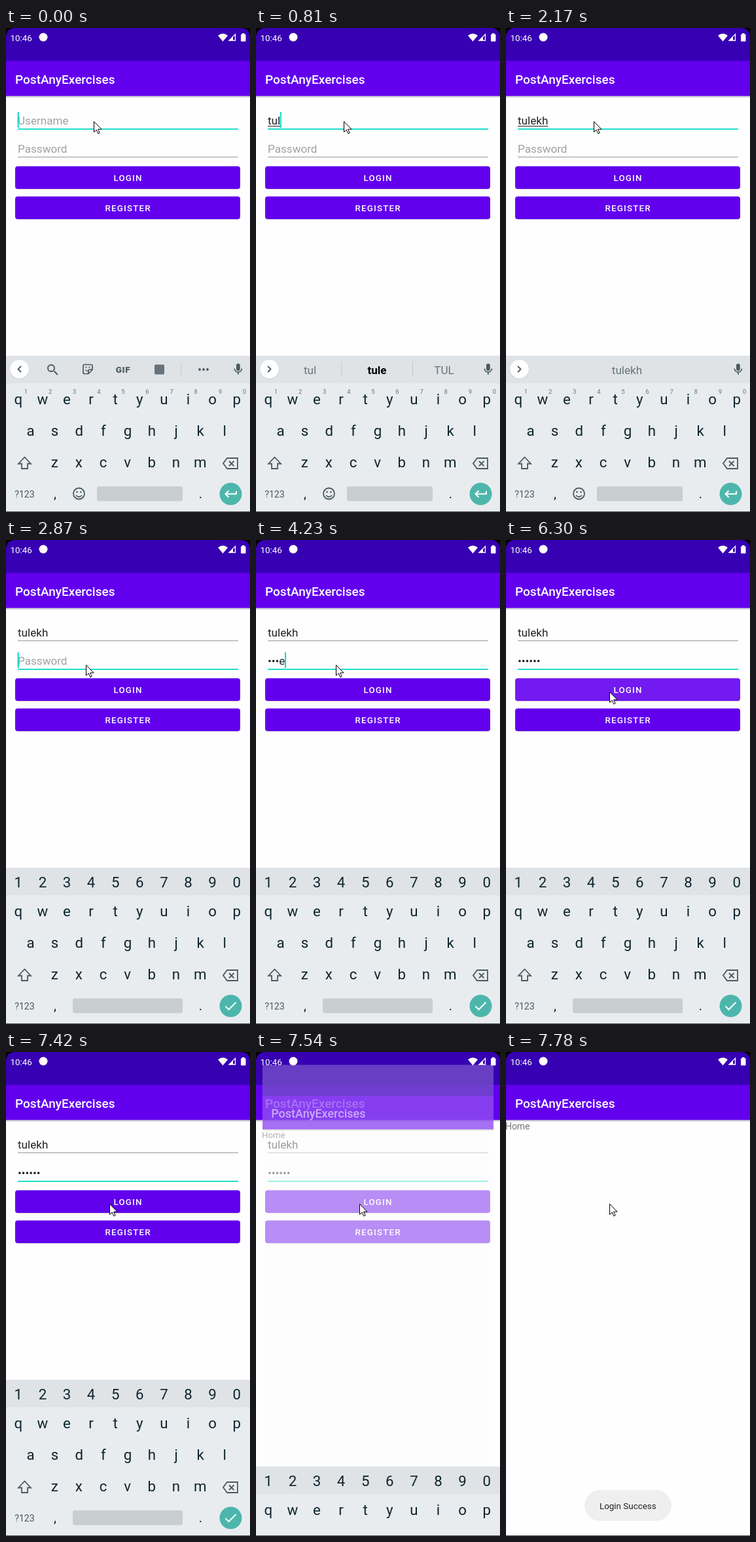
Animation, 373 px wide and 737 px high, one loop 8 s. Source, as an HTML page with a canvas:

```html
<!DOCTYPE html>
<html lang="en">
<head>
<meta charset="utf-8">
<title>Login demo</title>
<style>
  html, body { margin: 0; width: 100%; height: 100%; overflow: hidden; background: #fefefe; }
  canvas { display: block; }
</style>
</head>
<body>
<canvas id="stage" width="373" height="737"></canvas>
<script>
const W = 373, H = 737, LOOP = 8000;
const ctx = document.getElementById('stage').getContext('2d');
const PURPLE = '#6200ee', ACCENT = '#03dac5', ICON = '#4b5a61', KEY = '#0f252e';
const USER = 'tulekh';

// Times at which one more letter is visible: [time, letters]
const USER_TYPING = [[0, 0], [280, 1], [810, 3], [1060, 4], [1300, 5], [1670, 6]];
const PASS_TYPING = [[0, 0], [3470, 1], [3780, 2], [3930, 3], [4230, 4], [4380, 5], [4700, 6]];
const SUGGESTIONS = [
  [280, []],
  [400, ['t', 'to', 'think']],
  [810, ['tul', 'tule', 'TUL']],
  [1180, ['tule', 'rule', 'tules']],
  [1300, ['tulek', 'rules', 'tulle']],
  [1670, ['', USER, '']],
];
const CARET = [
  [0, true], [2170, false], [2580, true], [3320, false], [3470, true], [5200, false],
  [5690, true], [6180, false], [6670, true], [7420, false],
];
const POINTER = [
  [0, [134, 142]], [2310, [130, 165]], [2460, [124, 184]], [2580, [122, 190]],
  [5570, [131, 201]], [5690, [149, 222]], [5810, [158, 231]],
];

const at = (track, t) => track.reduce((value, [time, next]) => (t >= time ? next : value), track[0][1]);
const steps = (t, start, count) => Math.max(0, Math.min(count, Math.floor((t - start) / 120)));

function rect(x, y, w, h, color, radius = 0) {
  ctx.fillStyle = color;
  ctx.beginPath();
  ctx.roundRect(x, y, w, h, radius);
  ctx.fill();
}

function disc(x, y, r, color) {
  ctx.fillStyle = color;
  ctx.beginPath();
  ctx.arc(x, y, r, 0, 2 * Math.PI);
  ctx.fill();
}

function fill(d, color) {
  ctx.fillStyle = color;
  ctx.fill(new Path2D(d));
}

function stroke(d, color, width = 2) {
  ctx.strokeStyle = color;
  ctx.lineWidth = width;
  ctx.stroke(new Path2D(d));
}

function text(str, x, y, size, color, align = 'left', weight = 400, spacing = 0) {
  ctx.font = `${weight} ${size}px Roboto, sans-serif`;
  ctx.letterSpacing = spacing + 'px';
  ctx.textAlign = align;
  ctx.fillStyle = color;
  ctx.fillText(str, x, y);
  return ctx.measureText(str).width;
}

function appBar() {
  rect(0, 0, W, H, '#fefefe');
  rect(0, 0, W, 50, '#3700b3');
  const shadow = ctx.createLinearGradient(0, 103, 0, 107);
  shadow.addColorStop(0, 'rgba(0,0,0,.28)');
  shadow.addColorStop(1, 'rgba(0,0,0,0)');
  rect(0, 103, W, 4, shadow);
  rect(0, 50, W, 53.5, PURPLE);
  text('PostAnyExercises', 14, 84.5, 19, '#fff', 'left', 500);
}

function field(y, value, hint, { focused, active, caret, composing }) {
  const color = '#212121';
  if (value) {
    const width = text(value, 18, y, 17.1, color);
    if (composing) rect(18, y + 2, width, 1, color);
  } else {
    text(hint, 18, y, 17.1, '#a0a0a0');
  }
  if (active) rect(18, y + 6, 337, 1.8, ACCENT);
  else rect(18, y + 6, 337, 1, '#989898');
  if (focused && caret) {
    ctx.font = '400 17.1px Roboto, sans-serif';
    rect(17.6 + ctx.measureText(value).width, y - 19, 2, 24, ACCENT);
  }
}

function button(label, y) {
  rect(14, y + 1, 344, 34.5, 'rgba(0,0,0,.15)', 4);
  rect(14, y, 344, 34.5, PURPLE, 4);
}

function ripple(t) {
  const phase = steps(t, 6060, 3);
  if (t < 6060 || phase === 3) return;
  ctx.save();
  ctx.beginPath();
  ctx.roundRect(14, 210.5, 344, 34.5, 4);
  ctx.clip();
  disc(167, 235, phase ? 230 : 126.5, `rgba(255,255,255,${phase === 2 ? .1 : .2})`);
  ctx.restore();
}

function loginPage(t) {
  appBar();
  const onPassword = t >= 2870, caret = at(CARET, t);
  const typed = at(PASS_TYPING, t);
  const hidden = t >= 6180 ? typed : Math.max(0, typed - 1);
  const password = '•'.repeat(hidden) + USER.slice(hidden, typed);
  field(147, USER.slice(0, at(USER_TYPING, t)), 'Username',
    { focused: !onPassword, active: !onPassword, caret, composing: !onPassword });
  field(190, password, 'Password', { focused: onPassword, active: t >= 2730, caret });
  button('LOGIN', 210.5);
  button('REGISTER', 256.5);
  ripple(t);
  text('LOGIN', 186.6, 233, 13.3, '#fff', 'center', 500, 1.19);
  text('REGISTER', 186.6, 279, 13.3, '#fff', 'center', 500, 1.19);
}

function homePage() {
  appBar();
  text('Home', -1, 118, 13.9, '#757575');
}

function toast() {
  rect(120, 667, 133, 47, '#efefef', 23.5);
  text('Login Success', 186.3, 696, 13.4, '#222', 'center');
}

function toolbar() {
  stroke('M73.5 522.5L79 528M74 518a5 5 0 1 0-10 0a5 5 0 1 0 10 0', ICON);
  stroke('M120 512.5h10q2 0 2 2v6l-6 6h-6q-2 0-2-2v-10q0-2 2-2zM126 526v-4q0-2 2-2h4', ICON, 1.7);
  stroke('M121.5 520q1.5 3 4 2.500', ICON, 1.4);
  disc(122.5, 516.5, 1.1, ICON);
  disc(127.5, 516.5, 1.1, ICON);
  text('GIF', 179, 524.5, 13.5, ICON, 'center', 900, .6);
  rect(227, 512.5, 15, 15, '#66747a', 2);
  rect(267.5, 509, 1, 22, '#c5cacd');
  for (const x of [296, 302, 308]) disc(x, 520, 1.9, ICON);
}

function suggestions(words) {
  const [left, middle, right] = words;
  const gray = '#66747a';
  if (left) {
    text(left, 82.5, 526.5, 17.1, gray, 'center');
    text(right, 287.5, 526.5, 17.1, gray, 'center');
    rect(130.5, 508, 1, 23, '#c5cacd');
    rect(239, 508, 1, 23, '#c5cacd');
  }
  if (middle) text(middle, 185, 526.5, 17.1, left ? '#000' : gray, 'center', left ? 700 : 400);
}

function keyRow(chars, x, y) {
  [...chars].forEach((char, i) => text(char, x + i * 37.1, y, 22.3, KEY, 'center'));
}

function keyboard(t, offset) {
  ctx.save();
  ctx.translate(0, offset);
  const secret = t >= 2870;
  rect(0, 499, W, 238, '#e8ecef');
  rect(0, 499, W, 42, '#dfe3e6');

  if (secret) {
    keyRow('1234567890', 18.8, 528.5);
  } else {
    disc(20.5, 520, 14.6, 'rgba(0,0,0,.12)');
    disc(20.5, 519.5, 14.3, '#fff');
    stroke(t < 280 ? 'M23 515l-4.500 4.500l4.500 4.500' : 'M18 515l4.500 4.500l-4.500 4.500', ICON, 1.8);
    if (t < 280) toolbar();
    else suggestions(at(SUGGESTIONS, t));
    rect(352, 511, 5.8, 11, ICON, 2.9);
    stroke('M349.300 518.500a5.600 5.600 0 0 0 11.200 0M354.900 524v4', ICON, 1.6);
    [...'1234567890'].forEach((n, i) => text(n, 30.5 + i * 37.1, 557, 9.5, '#66747a', 'center'));
  }

  keyRow('qwertyuiop', 18.8, 573);
  keyRow('asdfghjkl', 37.5, 621);
  keyRow('zxcvbnm', 74.3, 669);

  stroke('M28.500 653.500l9.500 10h-5v7.500h-9v-7.500h-5z', ICON, 1.8);
  stroke('M338 655h16v16h-16l-6-8zM341 659.500l7.500 7.500M348.500 659.500l-7.500 7.500', ICON, 1.8);
  text('?123', 28.5, 714.5, 14.2, ICON, 'center');
  text(',', 75, 716, 20, KEY, 'center');
  text('.', 297.5, 716, 20, KEY, 'center');
  if (!secret) {
    stroke('M120 709a8.500 8.500 0 1 0-17 0a8.500 8.500 0 1 0 17 0M107 711.500q4.500 5 9 0', ICON, 1.8);
    disc(108.5, 706.5, 1.3, ICON);
    disc(114.5, 706.5, 1.3, ICON);
  }
  const left = secret ? 102 : 139;
  rect(left, 698, 270 - left, 22.5, '#c8cdd0', 3);
  disc(343.5, 709.5, 17, '#4db6ac');
  stroke(secret ? 'M335.500 710l5 5l11-11' : 'M352 705v4.500h-16M340.500 704.500l-5 5l5 5', '#fff', 2);
  ctx.restore();
}

function statusBar() {
  text('10:46', 6.5, 19.5, 13.4, '#fff');
  disc(57, 14, 6.5, '#fff');
  fill('M324 11.500q7.500-6 15 0l-7.500 9z', '#fff');
  stroke('M350.500 9.500v9.500h-9.500z', '#fff', 1.3);
  fill('M347 13v6h-6z', '#fff');
  rect(359, 9.5, 7.5, 11, '#fff', 1);
  rect(361, 8, 3.5, 2, '#fff');
  fill('M0 0h12Q2 1 0 12zM373 0h-12Q371 1 373 12z', '#000');
  rect(0, 736, W, 1, '#555');
}

function pointer([x, y]) {
  ctx.save();
  ctx.translate(x + .5, y + .5);
  const arrow = 'M0 0V16L3.700 12.500L6.300 18.300L8.700 17.300L6.200 11.700H11.500Z';
  fill(arrow, '#fff');
  stroke(arrow, '#000', 1);
  ctx.restore();
}

function draw(t) {
  const enter = 1 - (1 - steps(t, 7420, 3) / 3) ** 2;
  loginPage(t);
  if (enter) {
    const scale = .88 + .12 * enter;
    ctx.save();
    ctx.globalAlpha = enter;
    ctx.translate(W / 2, H / 2);
    ctx.scale(scale, scale);
    ctx.translate(-W / 2, -H / 2);
    homePage();
    ctx.restore();
  }
  if (enter < 1) keyboard(t, 238 * enter);
  ctx.globalAlpha = steps(t, 7540, 2) / 2;
  if (ctx.globalAlpha) toast();
  ctx.globalAlpha = 1;
  statusBar();
  pointer(at(POINTER, t));
}

function tick() {
  draw(performance.now() % LOOP);
  requestAnimationFrame(tick);
}
tick();
</script>
</body>
</html>
```
